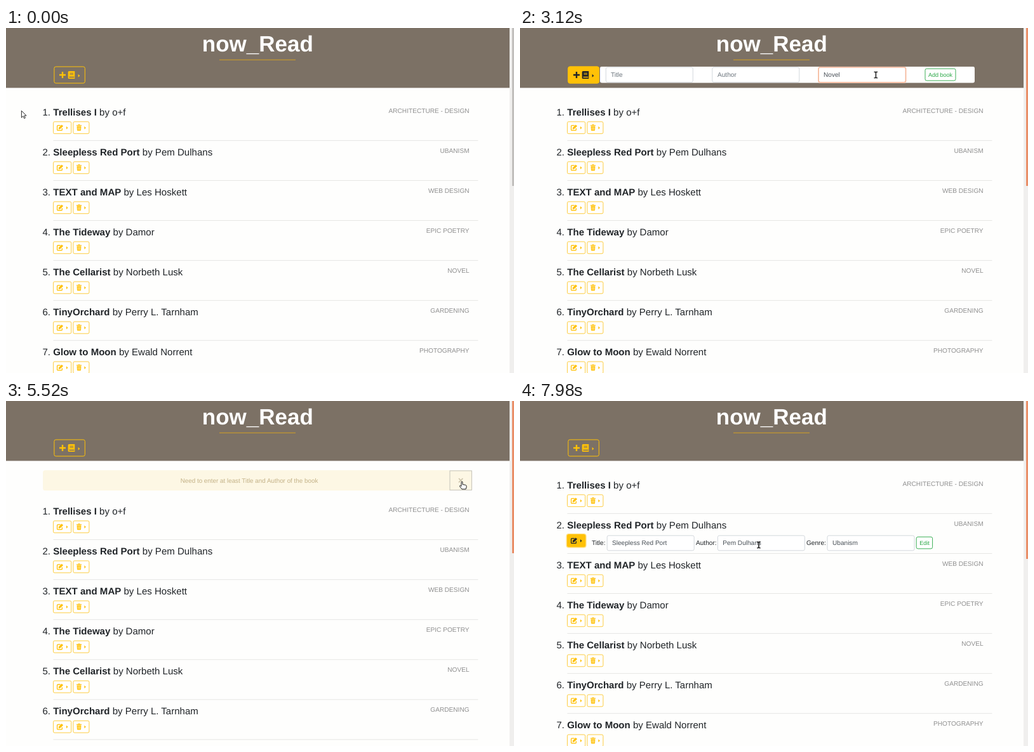
Write an HTML page that moves like this. It is 800 by 544 pixels and loops after 8000 ms.

```html
<!DOCTYPE html>
<html lang="en">
<head>
<meta charset="utf-8">
<title>Reading list</title>
<style>
html, body { margin: 0; width: 100%; height: 100%; overflow: hidden; background: #fefefd; }
svg { display: block; width: 100%; height: 100%; }
text { font: 10.1px "Liberation Sans", Arial, sans-serif; fill: #212529; text-rendering: geometricPrecision; white-space: pre; }
.book { font-size: 15.05px; }
.book tspan { font-weight: 700; }
.genre { font-size: 10.15px; fill: #8f8f8f; text-anchor: end; }
.end { text-anchor: end; }
.hint { fill: #6c757d; }
.value { fill: #495057; }
.small { font-size: 9px; fill: #28a745; }
.gold { color: #ffc107; }
.dark { color: #212529; }
.icon { fill: currentColor; }
.line { fill: none; stroke: currentColor; }
.field { fill: #fff; stroke: #ced4da; stroke-width: .9; }
.go { fill: #fff; stroke: #28a745; stroke-width: .9; }
.ring { fill: none; stroke: #ffc107; stroke-opacity: .5; stroke-width: 2; }

/* one loop is 8000 ms, so 1% is 80 ms */
.anim { animation: 8s linear infinite; }
.step { animation: 8s step-end infinite; }

#list { animation-name: shift; }
@keyframes shift { 0%, 70.5% { transform: none } 45% { transform: translateY(41.2px) } }
#thumb { animation-name: thumb; }
@keyframes thumb {
  0% { fill: #c1bfbd; transform: none }
  5.6%, 70.5%, 100% { fill: #e98f68; transform: none }
  45% { fill: #e98f68; transform: scaleY(.964) }
}
#addLit { animation-name: addLit; }
@keyframes addLit { 0%, 4.1% { opacity: 0 } 5.6%, 44.99% { opacity: 1 } 45%, 100% { opacity: 0 } }
#addRing { animation-name: addRing; }
@keyframes addRing { 0%, 17.25% { visibility: hidden } 5.6% { visibility: visible } }
#addForm { animation-name: addForm; }
@keyframes addForm {
  0%, 5.6%, 45%, 100% { clip-path: inset(0 0 100% 0) }
  9.75%, 44.99% { clip-path: inset(0 0 0 0) }
}
#genreRing { animation-name: genreRing; }
@keyframes genreRing { 0%, 43.5% { visibility: hidden } 17.25% { visibility: visible } }
#genreHint { animation-name: genreHint; }
@keyframes genreHint { 0% { visibility: visible } 23.25%, 100% { visibility: hidden } }
#typed tspan { visibility: hidden; animation: typed 8s step-end var(--at) infinite; }
@keyframes typed { 0% { visibility: visible } 25%, 100% { visibility: hidden } }
#sendLit { animation-name: sendLit; }
@keyframes sendLit {
  0%, 11.5%, 14.6%, 41.6%, 45%, 100% { opacity: 0 }
  12%, 13.5%, 42.75%, 44.99% { opacity: 1 }
}
#alert { animation-name: alert; }
@keyframes alert { 0%, 44.99% { opacity: 0 } 45%, 67.9% { opacity: 1 } 70.1%, 100% { opacity: 0 } }
#closeBox { animation-name: closeBox; }
@keyframes closeBox { 0% { visibility: hidden } 68.25%, 100% { visibility: visible } }
#trash1 { animation-name: trash; }
@keyframes trash { 0% { opacity: 1 } 83.25% { opacity: .7 } 89.25%, 100% { opacity: 0 } }
#trashLit { animation-name: trashLit; }
@keyframes trashLit { 0%, 81.75%, 84%, 100% { opacity: 0 } 82.5% { opacity: .8 } }
#editLit { animation-name: editLit; }
@keyframes editLit { 0%, 82.6% { opacity: 0 } 84%, 100% { opacity: 1 } }
#editRing { animation-name: editRing; }
@keyframes editRing { 0% { visibility: hidden } 89.25%, 100% { visibility: visible } }
#editForm { animation-name: editForm; }
@keyframes editForm { 0%, 89.25% { clip-path: inset(0 0 100% 0) } 93.75%, 100% { clip-path: inset(0 0 0 0) } }

#cursor { animation-name: path; }
@keyframes path {
  0%, .4% { transform: translate(24px, 130px) }
  4.5%, 10.5% { transform: translate(98px, 73px) }
  12%, 12.75% { transform: translate(669px, 74px) }
  17.25%, 39% { transform: translate(560px, 74px) }
  42.75%, 50.25% { transform: translate(672px, 73px) }
  55.5%, 57% { transform: translate(565px, 135px) }
  60% { transform: translate(640px, 116px) }
  63%, 65.24% { transform: translate(716px, 126px) }
  65.25%, 72% { transform: translate(718px, 127px) }
  82.5% { transform: translate(112px, 219px) }
  83.25%, 93% { transform: translate(88px, 219px) }
  96.75%, 99.74% { transform: translate(377px, 226px) }
  99.75%, 100% { transform: translate(376px, 227px) }
}
#arrow { animation-name: arrow; }
@keyframes arrow {
  0%, 10.5%, 13.5%, 40.5%, 45%, 70.5%, 93.4% { visibility: visible }
  3.75%, 11.6%, 14.6%, 41.6%, 62.25%, 81.75%, 94.1%, 100% { visibility: hidden }
}
#hand { animation-name: hand; }
@keyframes hand {
  0%, 10.5%, 13.5%, 45%, 70.5%, 93.4%, 100% { visibility: hidden }
  3.75%, 11.6%, 41.6%, 62.25%, 81.75% { visibility: visible }
}
#beam { animation-name: beam; }
@keyframes beam { 0%, 40.5% { visibility: hidden } 14.6%, 94.1%, 100% { visibility: visible } }
</style>
</head>
<body>
<svg viewBox="0 0 800 544">
  <defs>
    <g id="addIcon" class="icon">
      <path d="M87.8 69h2.4v3.8H94v2.4h-3.8V79h-2.4v-3.8H84v-2.4h3.8z"/>
      <path fill-rule="evenodd" d="M99.2 68h9.1v12h-9.1q-1.5 0-1.5-1.5v-9q0-1.5 1.5-1.5zM100.5 70.8h5.5v.8h-5.5zM100.5 72.6h5.5v.8h-5.5zM99.5 76.8h8v1.4h-8z"/>
      <path d="M113.6 72.8l2.8 2.5-2.8 2.5z"/>
    </g>
    <g id="editIcon" class="icon">
      <path class="line" stroke-width="1.3" d="M85.8 153.6h-4q-1.2 0-1.2 1.2v5.4q0 1.2 1.2 1.2h5.4q1.2 0 1.2-1.2v-2.2"/>
      <path d="M87.7 152.4l2.4 2.3-4.7 4.6-2.6.4.3-2.6z"/>
      <path d="M95 155l2.5 2.4-2.5 2.4z"/>
    </g>
    <g id="trashIcon" class="icon">
      <path fill-rule="evenodd" d="M111 153h2.4l.6-.9h2l.6.9h2.4v1.3h-8zM111.6 155h6.8l-.4 6.2q-.1.8-.9.8h-4.2q-.8 0-.9-.8zM113.2 156.2v4.6h.5v-4.6zM114.8 156.2v4.6h.5v-4.6zM116.4 156.2v4.6h.5v-4.6z"/>
      <path d="M123.4 155l2.5 2.4-2.5 2.4z"/>
    </g>
    <rect id="editBox" x="74.5" y="147.8" width="28.2" height="18.8" rx="2"/>
    <rect id="trashBox" x="105.9" y="147.8" width="25" height="18.8" rx="2"/>
  </defs>

  <g id="list" class="step">
    <g id="rows"></g>
    <g transform="translate(0 63.05)" class="dark">
      <g id="trashLit" class="anim"><use href="#trashBox" fill="#ffc107"/><use href="#trashIcon"/></g>
      <g id="editLit" class="anim">
        <use href="#editBox" fill="#ffc107" stroke="#ffc107"/><use href="#editIcon"/>
        <rect id="editRing" class="ring step" x="73.6" y="146.9" width="30" height="20.6" rx="3"/>
      </g>
    </g>
    <g id="editForm" class="anim"></g>
  </g>

  <rect width="793" height="94.4" fill="#7c7165"/>
  <text x="396.3" y="37.3" text-anchor="middle" style="font-size:35px;font-weight:700;fill:#fff">now_Read</text>
  <rect x="336" y="49.7" width="120" height="1" fill="#d3a023"/>

  <g class="gold"><rect class="line" x="75.9" y="61" width="48.4" height="26" rx="2.6"/><use href="#addIcon"/></g>
  <g id="addForm" class="anim"></g>
  <g id="addLit" class="anim dark">
    <rect x="75.9" y="61" width="48.4" height="26" rx="2.6" fill="#ffc107" stroke="#ffc107"/><use href="#addIcon"/>
    <rect id="addRing" class="ring step" x="75" y="60.1" width="50.2" height="27.8" rx="3.4"/>
  </g>

  <g id="alert" class="anim">
    <rect x="58.7" y="109.7" width="675" height="31" rx="2.5" fill="#fcf1cb" stroke="#fbecbc" stroke-width=".7"/>
    <text x="383" y="129" text-anchor="middle" style="font-size:9.85px;fill:#8a6511">Need to enter at least Title and Author of the book</text>
    <rect id="closeBox" class="step" x="699" y="110" width="34.4" height="30.4" fill="none" stroke="#8c8a78"/>
    <path d="M713 122l6.4 6.4m0-6.4l-6.4 6.4" stroke="#a08f5c" stroke-width="1.7"/>
  </g>

  <rect x="793" width="7" height="544" fill="#f0efee"/>
  <rect id="thumb" class="step" x="797" width="3" height="249"/>

  <g id="cursor" class="anim">
    <path id="arrow" class="step" d="M.4.5v10.8l2.5-2.4 1.8 3.7 1.7-.8-1.7-3.6h3.3z" fill="#fff" stroke="#222" stroke-width=".95"/>
    <path id="hand" class="step" d="M-1 1.2a1 1 0 0 1 2 0v3.4l4.6.8q1.6.4 1.5 2v1.6l-1 3H0l-3.4-4.2q-.6-1.4.8-1.5l1.6 1.2z" fill="#fff" stroke="#111" stroke-width=".95"/>
    <path id="beam" class="step" d="M-2.6-4.6h1.4q1.2 0 1.2 1 0-1 1.2-1h1.4M0-3.6v7.2M-2.6 4.6h1.4q1.2 0 1.2-1 0 1 1.2 1h1.4" fill="none" stroke="#222" stroke-width="1.6"/>
  </g>
</svg>
<script>
const books = [
  ['Trellises I', 'o+f', 'ARCHITECTURE - DESIGN'],
  ['Sleepless Red Port', 'Pem Dulhans', 'UBANISM'],
  ['TEXT and MAP', 'Les Hoskett', 'WEB DESIGN'],
  ['The Tideway', 'Damor', 'EPIC POETRY'],
  ['The Cellarist', 'Norbeth Lusk', 'NOVEL'],
  ['TinyOrchard', 'Perry L. Tarnham', 'GARDENING'],
  ['Glow to Moon', 'Ewald Norrent', 'PHOTOGRAPHY']
];
const fill = (id, html) => { document.getElementById(id).innerHTML = html; };
const text = (x, y, cls, str, id = '') => `<text x="${x}" y="${y}" class="${cls}" ${id}>${str}</text>`;
const box = (cls, x, y, w, h) => `<rect class="${cls}" x="${x}" y="${y}" width="${w}" height="${h}" rx="2.5"/>`;
const field = (x, y) => box('field', x, y, 137, 23.6);
const outlined = name =>
  `<use href="#${name}Box" fill="#fff" stroke="#fdc82c" stroke-width=".9"/><use href="#${name}Icon"/>`;

fill('rows', books.map(([title, author, genre], i) => `
  <g transform="translate(0 ${i * 63.05})" class="gold">
    ${text(70, 138, 'book end', i + 1 + '.')}
    ${text(74.3, 138, 'book', `<tspan>${title}</tspan> by ${author}`)}
    ${text(729.6, 133.8, 'genre', genre)}
    ${outlined('edit')}
    <g id="trash${i}" ${i === 1 ? 'class="step"' : ''}>${outlined('trash')}</g>
    <rect x="74.4" y="176.9" width="669" height="1" fill="#e6e6e4"/>
  </g>`).join(''));

const keyTimes = [1860, 2100, 2340, 2520, 2700];
const typed = [...'Novel'].map((c, i) => `<tspan style="--at:${keyTimes[i]}ms">${c}</tspan>`).join('');
fill('addForm', `
  <rect x="126" y="60.8" width="590" height="25.6" rx="3" fill="#fff"/>
  ${field(135.3, 62)}${text(143, 77, 'hint', 'Title')}
  ${field(302.8, 62)}${text(311, 77, 'hint', 'Author')}
  ${field(470.3, 62)}${text(478, 77, 'hint step', 'Genre', 'id="genreHint"')}
  <g id="genreRing" class="step" fill="none">
    <rect x="469.9" y="61.6" width="137.8" height="24.4" rx="3" stroke="#fbd3c0" stroke-width="1.8"/>
    <rect x="470.3" y="62" width="137" height="23.6" rx="2.5" stroke="#f5ad8c" stroke-width=".9"/>
  </g>
  ${text(478, 77, 'value', typed, 'id="typed"')}
  ${box('go', 638, 64.2, 48, 18.8)}${text(643, 77, 'small', 'Add book')}
  <g id="sendLit" class="anim">
    <rect x="638" y="64.2" width="48" height="18.8" rx="2" fill="#cbcecb" stroke="#45b062"/>
    ${text(643, 77, 'small', 'Add book')}
  </g>`);

const [title, author] = books[1];
fill('editForm', `
  ${text(113, 227, '', 'Title:')}${field(137.2, 212.2)}${text(145, 227, 'value', title)}
  ${text(277, 227, '', 'Author:')}${field(311.4, 212.2)}${text(319.3, 227, 'value', author)}
  ${text(451, 227, '', 'Genre:')}${field(484, 212.2)}${text(492, 227, 'value', 'Ubanism')}
  ${box('go', 624.2, 214.3, 25.4, 18.6)}${text(629.2, 227, 'small', 'Edit')}`);
</script>
</body>
</html>
```
